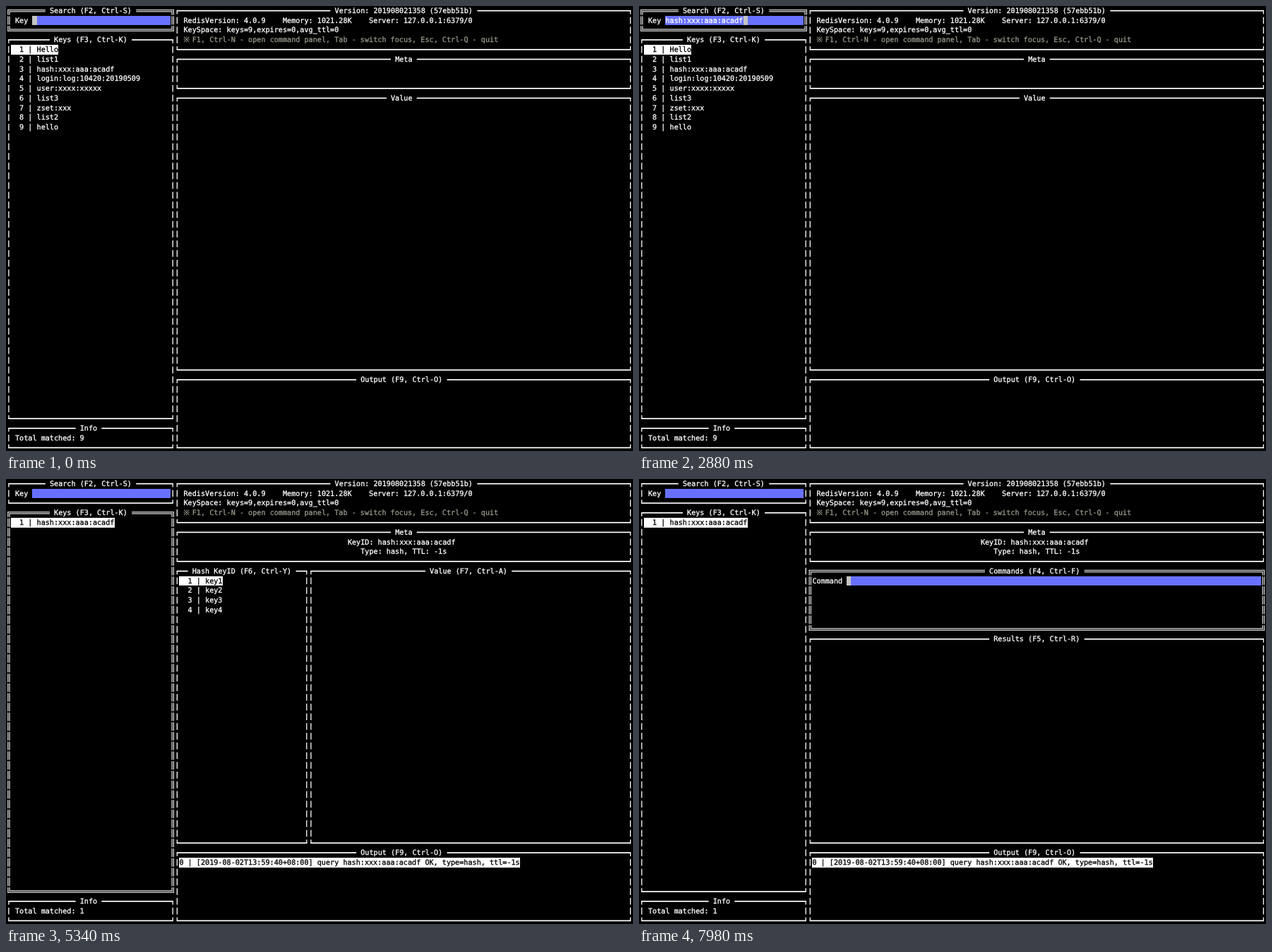
These frames come from a looping animation (888 by 631 pixels, 8 s). An HTML page:

```html
<!DOCTYPE html>
<html lang="en">
<head>
<meta charset="utf-8">
<title>Redis terminal browser</title>
<style>
  html, body { margin: 0; width: 100%; height: 100%; overflow: hidden; background: #000; }
  svg { display: block; }
  text {
    font: 10.157px "DejaVu Sans Mono", "Liberation Mono", monospace;
    text-rendering: geometricPrecision;
    font-variant-ligatures: none;
    stroke-width: 0.3px;
  }
</style>
</head>
<body>
<svg id="screen" width="888" height="631" viewBox="0 0 888 631"></svg>
<script>
const LOOP = 8000;
const CW = 6.115, RH = 13.77;
const WHITE = '#fff', BLUE = '#6871ff', CURSOR = '#c4c4c4', DIM = '#96968a';
const HASH = 'hash:xxx:aaa:acadf';
const KEYS = ['Hello', 'list1', HASH, 'login:log:10420:20190509', 'user:xxxx:xxxxx',
  'list3', 'zset:xxx', 'list2', 'hello'];
const FIELDS = ['key1', 'key2', 'key3', 'key4'];

// Each step changes part of the screen state.
const steps = [
  [0, { focus: 'search', input: '', hint: false, keys: KEYS, view: 'empty', opened: false, pick: 0, value: 0 }],
  [420, { input: 'h', hint: true }],
  [780, { input: 'ha' }],
  [2280, { input: HASH, hint: false }],
  [3180, { input: '', keys: [HASH], focus: 'keys' }],
  [4260, { view: 'hash', opened: true }],
  [5400, { focus: 'hash' }],
  [5760, { value: 1 }],
  [6120, { pick: 1 }],
  [6600, { value: 2 }],
  [7800, { view: 'cmd', focus: 'cmd' }]
];

const left = c => 0.8 + c * CW;
const midX = c => left(c) + CW / 2;
const midY = r => 6.7 + r * RH;
const rect = (x, y, w, h, fill) =>
  `<rect x="${x.toFixed(2)}" y="${y.toFixed(2)}" width="${w.toFixed(2)}" height="${h.toFixed(2)}" fill="${fill}"/>`;
const text = (c, r, s, fill = WHITE) =>
  `<text x="${left(c).toFixed(2)}" y="${(midY(r) + 3.2).toFixed(2)}" fill="${fill}" stroke="${fill}">${s.replace(/ /g, '\u00a0')}</text>`;
const marked = (c, r, s) => block(c, r, s.length, WHITE) + text(c, r, s, '#000');

// Filled cells, snapped to whole pixels.
function block(c, r, n, fill) {
  const x = Math.round(left(c)), y = Math.round(midY(r) - RH / 2);
  return rect(x, y, Math.round(left(c + n)) - x, Math.round(midY(r) + RH / 2) - y, fill);
}

function panel(c0, r0, c1, r1, title, double) {
  const label = title.length + 2;
  const gap = c0 + Math.floor((c1 - c0 + 1 - label) / 2);
  const offsets = double ? [-1.15, 1.15] : [0];
  const thick = double ? 1.3 : 1.7;
  const thin = 1.3;
  const color = double ? '#d4d4d4' : WHITE;
  const dash = double ? 12 : 9.6;
  const xa = midX(c0), xb = midX(c1), ya = midY(r0), yb = midY(r1);
  const hline = (x0, x1, y) => rect(x0, y - thick / 2, x1 - x0, thick, color);
  const vline = (x, y0, h) => rect(x - thin / 2, y0, thin, h, color);
  let out = text(gap + 1, r0, title);
  for (const d of offsets) {
    out += hline(xa + d - thin / 2, left(gap), ya + d);
    out += hline(left(gap + label), xb - d + thin / 2, ya + d);
    out += hline(xa + d - thin / 2, xb - d + thin / 2, yb - d);
    for (const x of [xa + d, xb - d]) {
      out += vline(x, ya + d, dash / 2 - d);
      out += vline(x, yb - dash / 2, dash / 2 - d);
      for (let r = r0 + 1; r < r1; r++) out += vline(x, midY(r) - dash / 2, dash);
    }
  }
  return out;
}

const list = (c, r, items, pick) => items.map((s, i) =>
  (i === pick ? marked : text)(c, r + i, `${String(i + 1).padStart(3)} | ${s}`)).join('');

function field(c, r, n, value, active) {
  return block(c, r, n, BLUE) + text(c, r, value) +
    (active ? block(c + value.length, r, 1, CURSOR) : '');
}

function mainView(s) {
  if (s.view === 'empty') return panel(39, 9, 144, 37, 'Value');
  if (s.view === 'cmd') {
    return panel(39, 9, 144, 15, 'Commands (F4, Ctrl-F)', s.focus === 'cmd') +
      text(40, 10, 'Command') + field(48, 10, 96, '', true) +
      panel(39, 16, 144, 37, 'Results (F5, Ctrl-R)');
  }
  return panel(39, 9, 69, 37, 'Hash KeyID (F6, Ctrl-Y)', s.focus === 'hash') +
    list(40, 10, FIELDS, s.pick) +
    panel(70, 9, 144, 37, s.value ? `Value: key${s.value}` : 'Value (F7, Ctrl-A)') +
    (s.value ? text(72, 10, `value${s.value}`) : '');
}

function render(s) {
  const parts = [
    panel(0, 0, 38, 2, 'Search (F2, Ctrl-S)', s.focus === 'search'),
    text(2, 1, 'Key'),
    field(6, 1, 32, s.input, s.focus === 'search'),
    panel(0, 3, 38, 42, 'Keys (F3, Ctrl-K)', s.focus === 'keys'),
    list(1, 4, s.keys, 0),
    panel(0, 43, 38, 45, 'Info'),
    text(2, 44, `Total matched: ${s.keys.length}`),
    panel(39, 0, 144, 4, 'Version: 201908021358 (57ebb51b)'),
    text(41, 1, 'RedisVersion: 4.0.9    Memory: 1021.28K    Server: 127.0.0.1:6379/0'),
    text(41, 2, 'KeySpace: keys=9,expires=0,avg_ttl=0'),
    text(41, 3, '※', DIM),
    text(43, 3, 'F1, Ctrl-N - open command panel, Tab - switch focus, Esc, Ctrl-Q - quit', DIM),
    panel(39, 5, 144, 8, 'Meta'),
    mainView(s),
    panel(39, 38, 144, 45, 'Output (F9, Ctrl-O)')
  ];
  if (s.opened) parts.push(
    text(79, 6, `KeyID: ${HASH}`),
    text(82, 7, 'Type: hash, TTL: -1s'),
    marked(40, 39, `0 | [2019-08-02T13:59:40+08:00] query ${HASH} OK, type=hash, ttl=-1s`)
  );
  if (s.hint) parts.push(marked(6, 2, HASH));
  return parts.join('');
}

const screen = document.getElementById('screen');
let state = {};
const scenes = steps.map(([at, change]) => {
  state = { ...state, ...change };
  return { at, html: render(state) };
});

let shown = null;
const start = performance.now();
function tick() {
  const t = (performance.now() - start) % LOOP;
  const scene = scenes.filter(s => s.at <= t).pop();
  if (scene !== shown) {
    screen.innerHTML = scene.html;
    shown = scene;
  }
  requestAnimationFrame(tick);
}
tick();
</script>
</body>
</html>
```
